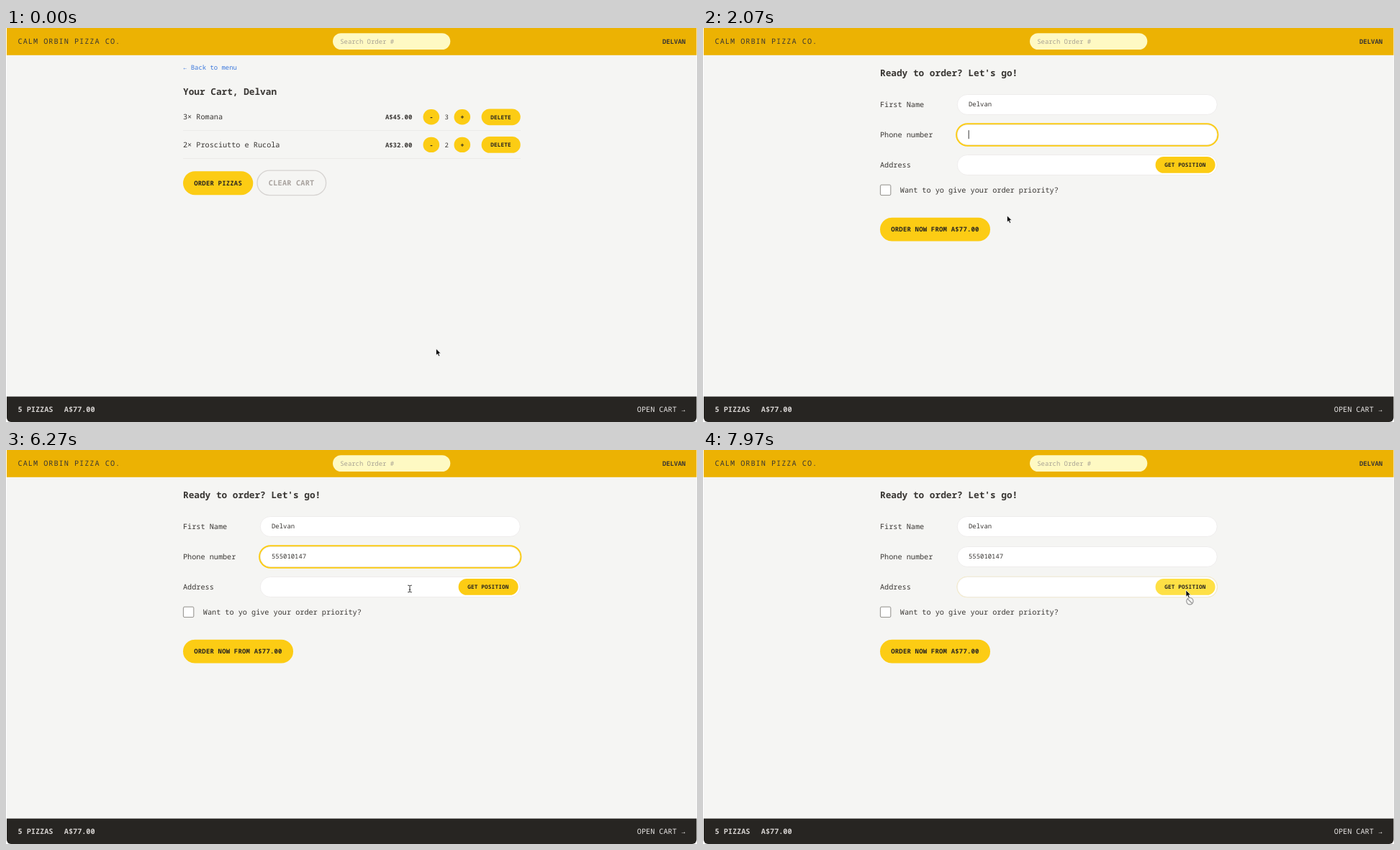
These frames come from a looping animation (960 by 548 pixels, 8000 ms). An HTML page:

```html
<!DOCTYPE html>
<html lang="en">
<head>
<meta charset="utf-8">
<title>Cart</title>
<style>
  html, body { margin: 0; width: 100%; height: 100%; overflow: hidden; background: #fff; }
  svg { display: block; }
  text { font-family: "Noto Sans Mono", "DejaVu Sans Mono", monospace; text-rendering: geometricPrecision; }
  .status { font-family: Inter, "Liberation Sans", sans-serif; }
</style>
</head>
<body>
<svg id="stage" width="960" height="548" viewBox="0 0 960 548"></svg>
<script>
const LOOP = 8000, SCALE = 0.6375;
const YELLOW = '#fccc14', BRIGHT = '#fee045', INK = '#393633', DARK = '#262320', LINE = '#e7e5e4';
const USER = 'Delvan', PHONE = '555010147';

// Text placed by its left edge and the middle of its capitals.
function text(x, mid, str, { size = 16, weight = 400, fill = INK, track = 0, attrs = '' } = {}) {
  const px = size * SCALE;
  return `<text x="${x}" y="${mid + px * 0.357}" font-size="${px}" font-weight="${weight}" ` +
    `letter-spacing="${px * track}" fill="${fill}" ${attrs}>${str}</text>`;
}

const rect = (x, y, w, h, fill, attrs = '') =>
  `<rect x="${x}" y="${y}" width="${w}" height="${h}" fill="${fill}" ${attrs}/>`;

const pill = (x, y, w, h, fill, attrs = '') => rect(x, y, w, h, fill, `rx="${h / 2}" ${attrs}`);

function button(x, y, w, h, label, pad, size, id = '') {
  return pill(x, y, w, h, YELLOW, id && `id="${id}"`) +
    text(x + pad, y + h / 2, label, { size, weight: 600, fill: DARK, track: 0.025 });
}

function cartRow(mid, count, name, price) {
  const small = { size: 14, weight: 600 };
  return text(246, mid, `${count}× ${name}`) +
    text(526.9, mid, price, small) +
    pill(579.5, mid - 10.7, 22.6, 21.4, YELLOW) + text(588.3, mid, '-', { ...small, fill: DARK }) +
    text(609.6, mid, count, { size: 14, weight: 500 }) +
    pill(622.5, mid - 10.7, 22.6, 21.4, YELLOW) + text(631.2, mid, '+', { ...small, fill: DARK }) +
    button(660.6, mid - 11.4, 54.1, 22.8, 'DELETE', 12.6, 12) +
    rect(246, mid + 18.6, 469, 0.7, LINE);
}

const FIELD = { x: 353, w: 361.5, h: 28.6 };
const fieldTop = { name: 92.2, phone: 134.2, address: 176.2 };

function field(id, label) {
  const y = fieldTop[id], mid = y + FIELD.h / 2;
  return text(246, mid, label) +
    pill(FIELD.x, y, FIELD.w, FIELD.h, YELLOW, `id="${id}Ring"`) +
    pill(FIELD.x + 0.3, y + 0.3, FIELD.w - 0.6, FIELD.h - 0.6, '#fff', `stroke="${LINE}" stroke-width=".64"`) +
    text(369, mid - 0.2, id === 'name' ? USER : '', { size: 14, attrs: `id="${id}Text"` });
}

const frame = `
  <clipPath id="win"><rect x="1" y="-6" width="958.4" height="554" rx="6"/></clipPath>
  <g clip-path="url(#win)">
    ${rect(0, 0, 960, 548, '#f5f5f3')}
    ${rect(0, 0, 960, 37.8, '#ecb203')}
    ${text(16.5, 18.7, 'CALM ORBIN PIZZA CO.', { track: 0.1 })}
    ${pill(454, 7.2, 163.3, 22.8, '#fef9c3')}
    ${text(464.2, 18.6, 'Search Order #', { size: 14, fill: '#a8a294' })}
    ${text(912, 18.7, USER.toUpperCase(), { size: 14, weight: 600 })}
    ${rect(0, 512.6, 960, 36, '#272522')}
    ${text(16.5, 530.6, '5 PIZZAS', { weight: 600, fill: '#d6d3d1' })}
    ${text(80.8, 530.6, 'A$77.00', { weight: 600, fill: '#d6d3d1' })}
    ${text(876.8, 530.6, 'OPEN CART →', { fill: '#e7e5e4' })}
  </g>`;

const cart = `<g id="cart">
    ${text(246, 54.6, '← Back to menu', { size: 14, fill: '#3b78dc' })}
    ${text(246, 88.3, `Your Cart, ${USER}`, { size: 20, weight: 600 })}
    ${cartRow(123.8, 3, 'Romana', 'A$45.00')}
    ${cartRow(162.4, 2, 'Prosciutto e Rucola', 'A$32.00')}
    <g id="orderRing">
      ${pill(242.8, 196, 103.7, 39.4, BRIGHT)}
      ${pill(244.7, 197.9, 99.9, 35.6, '#fff')}
    </g>
    ${button(246, 199.2, 97.3, 33, 'ORDER PIZZAS', 15.2, 14, 'order')}
    ${pill(349, 198.2, 95.6, 34.4, 'none', 'stroke="#d6d3d1" stroke-width="1.3"')}
    ${text(364.8, 215.6, 'CLEAR CART', { weight: 600, fill: '#a8a29e', track: 0.025 })}
  </g>`;

const form = `<g id="form">
    ${text(246, 62.8, "Ready to order? Let's go!", { size: 20, weight: 600 })}
    ${field('name', 'First Name')}
    ${field('phone', 'Phone number')}
    ${field('address', 'Address')}
    ${button(628.6, 179, 83, 22.8, 'GET POSITION', 12.6, 12, 'position')}
    ${rect(246.4, 218.2, 14.4, 14.4, '#fff', 'rx="1.6" stroke="#77746f" stroke-width=".8"')}
    ${text(273.8, 225.8, 'Want to yo give your order priority?', { weight: 500 })}
    ${button(246, 263.8, 153, 32.8, 'ORDER NOW FROM A$77.00', 15.2, 14)}
    ${rect(0, 0, 0.9, 12, '#222', 'id="caret"')}
  </g>`;

const overlay = `
  <g id="status">
    <path d="M0 535.5H97q2.5 0 2.5 2.5V548H0Z" fill="#e3e2e0" stroke="#b9b7b4" stroke-width=".5"/>
    <text class="status" x="4.5" y="544.6" font-size="7.6" fill="#333">pilotbase:4826/table/now</text>
  </g>
  <g id="cursor">
    <path id="arrow" d="M0 0V9.2L2.1 7.3 3.6 10.6 5.2 9.9 3.8 6.7H6.6Z" fill="#000" stroke="#fff" stroke-width=".7"/>
    <path id="beam" d="M-2.8-4.8Q-.4-4.8 0-3.8 .4-4.8 2.8-4.8M0-3.8V3.8M-2.8 4.8Q-.4 4.8 0 3.8 .4 4.8 2.8 4.8M-1.2 1.2H1.2" fill="none" stroke="#222" stroke-width=".9"/>
    <g id="denied" fill="#f4f4f2" stroke="#929292" stroke-width="1.1">
      <circle cx="5.4" cy="15.2" r="4.7"/><path d="M2.1 11.9 8.7 18.5"/>
    </g>
  </g>`;

document.getElementById('stage').innerHTML = frame + cart + form + overlay;
const el = {};
document.querySelectorAll('svg [id]').forEach(n => el[n.id] = n);

// Times of the events, in ms
const HOVER = 500, PRESS = 890, ROUTE = 1030, PHONE_FOCUS = 1630, ADDRESS_FOCUS = 6470;
const POSITION_HOVER = 6930, DISABLE = 7830, CURSOR_BACK = 5890;
const KEYS = [2400, 2770, 2970, 3170, 3400, 3570, 5070, 5230, 5370];
const PATH = [
  [30, 597.5, 446], [600, 305.5, 218], [1080, 305.5, 218], [1570, 369, 158], [1620, 369, 154],
  [1740, 369, 154], [2120, 425, 266], [5890, 425, 266], [6270, 561, 193], [6600, 561, 193],
  [6830, 660, 206], [7230, 671, 195]
];

const progress = (t, start, ms = 300) => Math.min(1, Math.max(0, (t - start) / ms));
const easeOut = p => 1 - (1 - p) ** 2;
const smooth = p => p * p * (3 - 2 * p);
const show = (node, on) => node.setAttribute('visibility', on ? 'inherit' : 'hidden');

function pointAt(t) {
  const i = PATH.findIndex(p => p[0] > t);
  if (i === 0) return PATH[0].slice(1);
  if (i < 0) return PATH[PATH.length - 1].slice(1);
  const [t0, x0, y0] = PATH[i - 1], [t1, x1, y1] = PATH[i];
  const k = smooth((t - t0) / (t1 - t0));
  return [x0 + (x1 - x0) * k, y0 + (y1 - y0) * k];
}

function mix(a, b, k) {
  const channel = (c, i) => parseInt(c.slice(i, i + 2), 16);
  return `rgb(${[1, 3, 5].map(i => Math.round(channel(a, i) + (channel(b, i) - channel(a, i)) * k))})`;
}

function setRing(id, focus, blur, t) {
  const k = easeOut(progress(t, focus)) * (1 - easeOut(progress(t, blur)));
  const s = 1.9 * k, ring = el[id + 'Ring'];
  const box = { x: FIELD.x - s, y: fieldTop[id] - s, width: FIELD.w + 2 * s, height: FIELD.h + 2 * s, rx: FIELD.h / 2 + s, opacity: k };
  for (const key in box) ring.setAttribute(key, box[key]);
}

function setCaret(t, typed) {
  const onAddress = t >= ADDRESS_FOCUS;
  const since = onAddress ? ADDRESS_FOCUS : typed ? KEYS[typed - 1] : PHONE_FOCUS;
  const lit = Math.floor((t - since) / 500) % 2 === 0;
  el.caret.setAttribute('x', 368.7 + (onAddress ? 0 : typed * 14 * SCALE * 0.6));
  el.caret.setAttribute('y', onAddress ? 184.3 : 142.2);
  show(el.caret, t >= PHONE_FOCUS && t < DISABLE && lit);
}

function setCursor(t) {
  const [x, y] = pointAt(t);
  const inField = t >= ROUTE && x > FIELD.x && x < FIELD.x + FIELD.w &&
    Object.values(fieldTop).some(top => y > top && y < top + FIELD.h);
  const beam = inField && x < 628;
  el.cursor.setAttribute('transform', `translate(${x} ${y})`);
  show(el.cursor, t < KEYS[0] || t >= CURSOR_BACK);
  show(el.beam, beam);
  show(el.arrow, !beam);
  show(el.denied, t >= DISABLE);
}

function render(t) {
  const typed = KEYS.filter(k => k <= t).length;
  show(el.cart, t < ROUTE);
  show(el.form, t >= ROUTE);
  show(el.status, t >= HOVER + 60 && t < ROUTE);
  show(el.orderRing, t >= PRESS);
  el.order.setAttribute('fill', mix(YELLOW, BRIGHT, smooth(progress(t, HOVER))));
  el.position.setAttribute('fill', mix(YELLOW, BRIGHT, smooth(progress(t, POSITION_HOVER))));
  setRing('name', LOOP, LOOP, t);
  setRing('phone', PHONE_FOCUS, ADDRESS_FOCUS, t);
  setRing('address', ADDRESS_FOCUS, DISABLE, t);
  el.phoneText.textContent = PHONE.slice(0, typed);
  setCaret(t, typed);
  setCursor(t);
}

function tick() {
  render(performance.now() % LOOP);
  requestAnimationFrame(tick);
}
tick();
</script>
</body>
</html>
```
